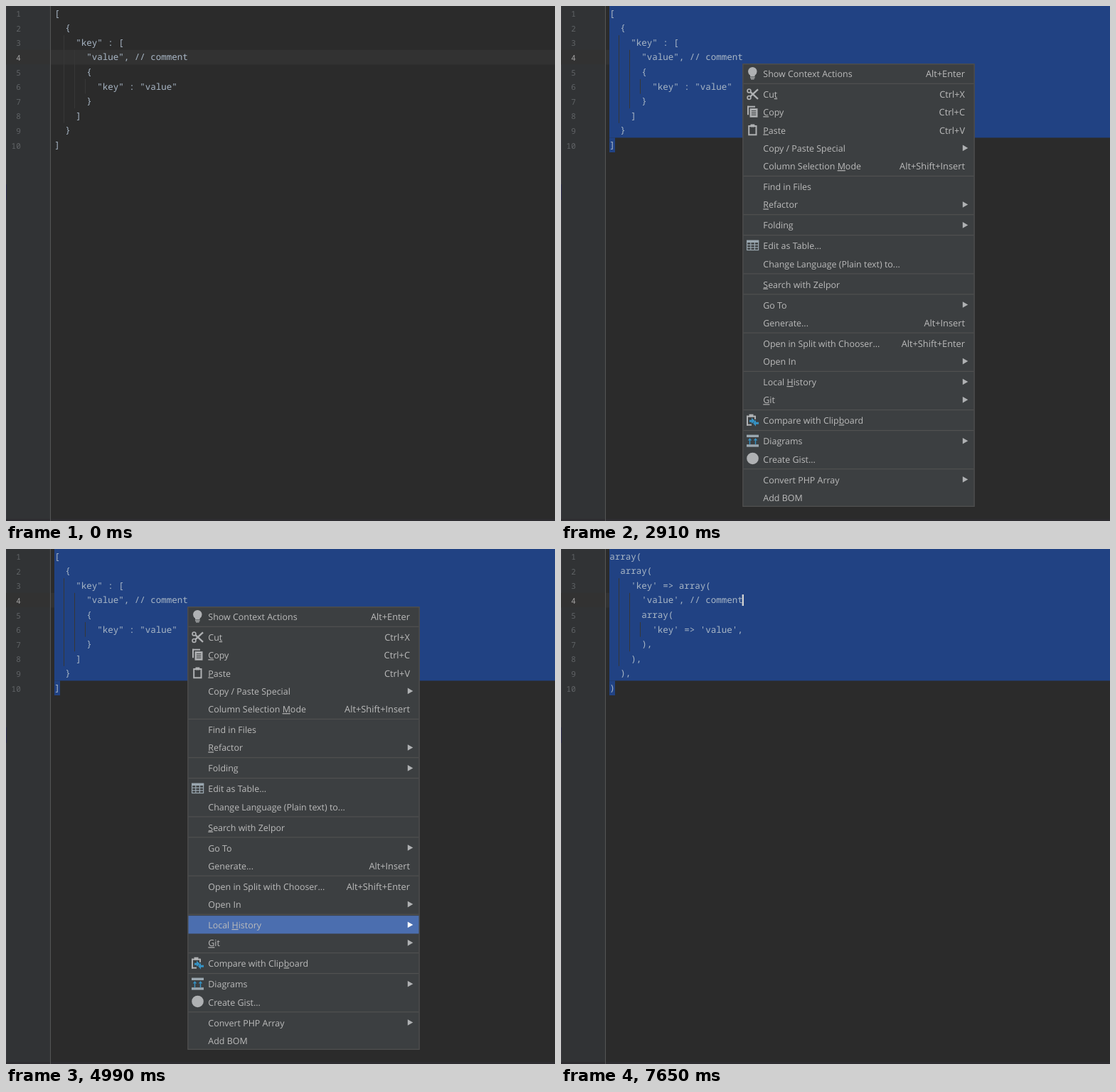
These frames come from a looping animation (772x725 px, 8000 ms). An HTML page with a canvas:

```html
<!DOCTYPE html>
<html lang="en">
<head>
<meta charset="utf-8">
<title>Convert array menu</title>
<style>
  html, body { margin: 0; width: 100%; height: 100%; overflow: hidden; background: #2b2b2b; }
  canvas { display: block; }
</style>
</head>
<body>
<canvas id="stage" width="772" height="725"></canvas>
<script>
const ctx = document.getElementById('stage').getContext('2d');
ctx.textRendering = 'geometricPrecision';

const LOOP = 8000;
const ROW = 20.6, TEXT_X = 68.3, CHAR = 7.5;
const HAIRLINE = 1.15;
const MONO = '"Noto Sans Mono", monospace';
const UI = '"Open Sans", sans-serif';
const ICON = '#afb1b3', STEEL = '#9aa7b0', BLUE = '#3592c4', HOVER = '#4b6eaf';

const JSON_CODE = `[
  {
    "key" : [
      "value", // comment
      {
        "key" : "value"
      }
    ]
  }
]`.split('\n');

const PHP_CODE = `array(
  array(
    'key' => array(
      'value', // comment
      array(
        'key' => 'value',
      ),
    ),
  ),
)`.split('\n');

// "_" precedes the mnemonic letter, ">" marks a submenu, "-" is a separator.
const MENU = [
  ['Show Context Actions', 'Alt+Enter', bulb], '-',
  ['Cu_t', 'Ctrl+X', scissors],
  ['_Copy', 'Ctrl+C', sheets],
  ['_Paste', 'Ctrl+V', clipboard],
  ['Copy / Paste Special', '>'],
  ['Column Selection _Mode', 'Alt+Shift+Insert'], '-',
  ['Find in Files'],
  ['_Refactor', '>'], '-',
  ['Folding', '>'], '-',
  ['Edit as Table...', '', table],
  ['Change Language (Plain text) to...'], '-',
  ['_Search with Zelpor'], '-',
  ['Go To', '>'],
  ['Generate...', 'Alt+Insert'], '-',
  ['Open in Split with Chooser...', 'Alt+Shift+Enter'],
  ['Open In', '>'], '-',
  ['Local _History', '>'],
  ['_Git', '>'], '-',
  ['Compare with Clip_board', '', compare], '-',
  ['Diagrams', '>', diagrams],
  ['Create Gist...', '', disc], '-',
  ['Convert PHP Array', '>'],
  ['Add BOM']
];
const HOVER_PATH = [1, 3, 5, 7, 9, 12, 14, 16, 18, 20, 21];

function box(x, y, w, h, color) {
  ctx.fillStyle = color;
  ctx.fillRect(x, y, w, h);
}

function text(str, x, y, font, color, align = 'left') {
  ctx.font = font;
  ctx.fillStyle = color;
  ctx.textAlign = align;
  ctx.fillText(str, x, y);
}

function poly(points, color) {
  ctx.fillStyle = color;
  ctx.beginPath();
  points.forEach(([x, y]) => ctx.lineTo(x, y));
  ctx.fill();
}

function line(x1, y1, x2, y2, width, color = ICON) {
  ctx.strokeStyle = color;
  ctx.lineWidth = width;
  ctx.beginPath();
  ctx.moveTo(x1, y1);
  ctx.lineTo(x2, y2);
  ctx.stroke();
}

function circle(x, y, r, stroke) {
  ctx.beginPath();
  ctx.arc(x, y, r, 0, Math.PI * 2);
  ctx.fillStyle = ctx.strokeStyle = ICON;
  ctx.lineWidth = stroke || 1;
  if (stroke) ctx.stroke(); else ctx.fill();
}

function outline(x, y, w, h, width, color = ICON) {
  ctx.strokeStyle = color;
  ctx.lineWidth = width;
  ctx.strokeRect(x, y, w, h);
}

// Icons are drawn around their own centre.
function bulb() {
  circle(0.3, -3.2, 6.2);
  box(-3, 1, 6.6, 3, ICON);
  box(-3, 4.8, 6.6, 1.4, ICON);
  box(-2, 6.8, 4.6, 1.2, ICON);
}
function scissors() {
  circle(-4.5, -5, 2.4, 1.7);
  circle(-4.5, 4.5, 2.4, 1.7);
  line(-2.8, -3.5, 8, 6.5, 2.3);
  line(-2.8, 3, 8, -7, 2.3);
}
function sheets() {
  line(-6, -9, -6, 3.5, 2);
  line(-7, -8, 4, -8, 2);
  box(-3.5, -5.5, 11, 12.5, ICON);
  for (const y of [-2.5, 0.3, 3]) box(-1.2, y, 6.5, 1.1, '#3c3f41');
}
function clipboard() {
  outline(-4.8, -6, 10.3, 12.3, 2);
  box(-2.5, -8.5, 5.8, 4, ICON);
}
function table() {
  outline(-7.4, -7.4, 16, 13.2, 1.2, STEEL);
  box(-8, -8, 17.2, 3.4, STEEL);
  for (const y of [-1.5, 2.2]) line(-8, y, 9, y, 1.2, STEEL);
  for (const x of [-2.2, 3.4]) line(x, -6, x, 6, 1.2, STEEL);
}
function compare() {
  line(-7, -7, -7, 7, 2);
  line(-8, 6, -1, 6, 2);
  line(-8, -6, 4, -6, 2);
  line(4, -7, 4, -2, 2);
  box(-4.5, -9, 6, 4, ICON);
  poly([[-4, -1], [-1, -1], [-1, -4], [4, 0.5], [-1, 4], [-1, 2], [-4, 2]], BLUE);
  poly([[9, 2], [5, 2], [5, -1], [1, 3.5], [5, 8], [5, 5], [9, 5]], BLUE);
}
function diagrams() {
  box(-8, -9, 17, 3.4, STEEL);
  box(-8, 4.6, 17, 3.4, STEEL);
  for (const x of [-3.5, 4.5]) {
    poly([[x - 2.8, -1.2], [x, -4.4], [x + 2.8, -1.2]], BLUE);
    line(x, -2, x, 4.6, 1.4, BLUE);
  }
}
function disc() { circle(0.5, -1, 8.3); }

function drawEditor({ code, selected, guides, caret }) {
  box(0, 0, 772, 725, '#2b2b2b');
  box(0, 0, 62, 725, '#313335');
  box(0, 0, 1, 725, '#39393f');
  box(0, 251, 1, 22, '#2c2b4c');
  box(0, ROW * 3, 772, ROW, '#323232');
  box(0, 722, 772, 3, '#2e2d31');
  box(62, 0, 1, 725, '#555555');

  if (selected) {
    box(68, 0, 704, ROW * 9, '#214283');
    box(68, ROW * 9, 8, ROW, '#214283');
  }
  if (guides) {
    [[81.5, 2, 8], [96.5, 3, 7], [111.5, 5, 6]].forEach(([x, from, to]) =>
      line(x, from * ROW, x, to * ROW, 1, '#373737'));
  }
  code.forEach((str, i) => {
    const y = i * ROW + 14.6;
    const indent = str.search(/\S/);
    text(i + 1, 20.8, y + 0.6, '11px ' + MONO, i === 3 ? '#a4a3a3' : '#606366', 'right');
    text(str.trim(), TEXT_X + indent * CHAR, y, '12.5px ' + MONO, '#a9b7c6');
  });
  if (caret) box(254.6, 64, 2.4, 16, '#d0d0d0');
}

function label(str, x, y) {
  const font = '12.45px ' + UI;
  const at = str.indexOf('_');
  const plain = str.replace('_', '');
  text(plain, x, y, font, '#bbbbbb');
  if (at < 0) return;
  const start = x + ctx.measureText(plain.slice(0, at)).width;
  box(start, y + 1, ctx.measureText(plain[at]).width, HAIRLINE, '#bbbbbb');
}

function drawPanel(left, top, right, bottom) {
  const w = right - left, h = bottom - top, half = HAIRLINE / 2;
  box(left, top, w, h, '#3c3f41');
  outline(left + half, top + half, w - HAIRLINE, h - HAIRLINE, HAIRLINE, '#515151');
}

function drawMenu(hover) {
  const itemHeight = 25.3, gap = 3.65;
  let top = 82.2, index = 0;
  drawPanel(255.3, 81.2, 581.7, 705);
  for (const item of MENU) {
    if (item === '-') {
      box(256.5, top + (gap - HAIRLINE) / 2, 324, HAIRLINE, '#515151');
      top += gap;
      continue;
    }
    const [name, extra, icon] = item;
    const mid = top + itemHeight / 2;
    const active = index++ === hover;
    if (active) box(256.5, top, 324, itemHeight, HOVER);
    label(name, 284.3, mid + 5.2);
    if (extra === '>') {
      poly([[564.8, mid - 4.1], [572.3, mid + 0.2], [564.8, mid + 4.5]], active ? '#ffffff' : ICON);
    } else if (extra) {
      text(extra, 568, mid + 5.2, '12.8px ' + UI, '#bbbbbb', 'right');
    }
    if (icon) {
      ctx.save();
      ctx.translate(269, mid + 0.6);
      icon();
      ctx.restore();
    }
    top += itemHeight;
  }
}

function drawSubmenu() {
  drawPanel(577.3, 651, 735.7, 703.7);
  box(578.5, 652, 156, 25.3, HOVER);
  label('JSON to PHP Array', 606, 669.4);
  label('PHP Array to JSON', 606.5, 694.8);
}

function hoverAt(t) {
  if (t < 3970) return -1;
  if (t < 4500) return 0;
  return HOVER_PATH[Math.min(HOVER_PATH.length - 1, Math.floor((t - 4500) / 70))];
}

const within = (t, from, to) => t >= from && t < to;

function render(t) {
  const converted = t >= 7320;
  drawEditor({
    code: converted ? PHP_CODE : JSON_CODE,
    selected: t >= 1660,
    guides: !within(t, 7320, 7650),
    caret: converted || within(t, 270, 730) || within(t, 1260, 1790) || within(t, 2250, 2780)
  });
  if (within(t, 2910, 7320)) drawMenu(hoverAt(t));
  if (within(t, 5930, 7320)) drawSubmenu();
}

const start = performance.now();
function tick() {
  render((performance.now() - start) % LOOP);
  requestAnimationFrame(tick);
}
tick();
</script>
</body>
</html>
```
